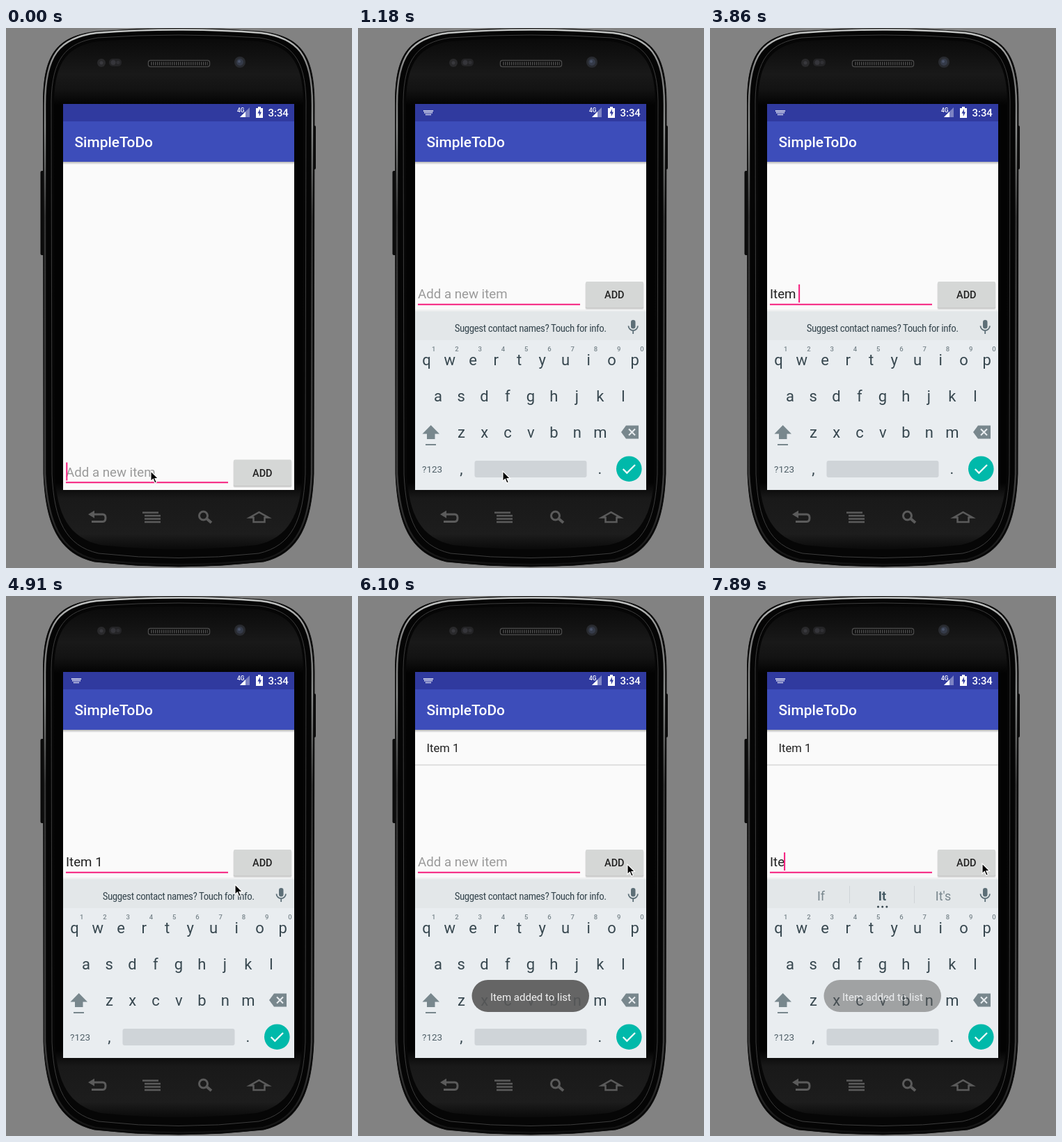
Write an HTML page that moves like this. It is 497 px wide and 775 px high and loops after 8000 ms.

```html
<!DOCTYPE html>
<html lang="en">
<head>
<meta charset="utf-8">
<title>To-do app demo</title>
<style>
  html, body { margin: 0; width: 100%; height: 100%; overflow: hidden; background: #828282; }
  svg { display: block; width: 497px; height: 775px; }
  text { font-family: Roboto, sans-serif; white-space: pre; }
  .mid { text-anchor: middle; }
  .medium { font-weight: 500; }
  .field { font-size: 18.7px; }
  .key { font-size: 22px; fill: #37474f; text-anchor: middle; }
  .digit { font-size: 9.5px; font-weight: 500; fill: #78858b; text-anchor: middle; }
  .word { font-size: 18px; fill: #78868d; text-anchor: middle; }
  .notice { font-family: "Roboto Condensed", Roboto, sans-serif; font-stretch: 75%; font-size: 15px; letter-spacing: -.46px; fill: #37474f; text-anchor: middle; }
</style>
</head>
<body>
<svg viewBox="0 0 497 775">
  <defs>
    <linearGradient id="rim" x2="0" y2="1">
      <stop offset="0" stop-color="#c8cac9"/><stop offset=".08" stop-color="#777"/>
      <stop offset=".18" stop-color="#8a8c8b"/><stop offset=".35" stop-color="#333"/>
      <stop offset=".85" stop-color="#3c3c3c"/><stop offset="1" stop-color="#111"/>
    </linearGradient>
    <linearGradient id="glass" x2="0" y2="1">
      <stop offset="0" stop-color="#0a0a0a"/><stop offset=".07" stop-color="#191919"/>
      <stop offset=".1" stop-color="#131313"/><stop offset=".13" stop-color="#030303"/>
      <stop offset=".87" stop-color="#030303"/><stop offset=".9" stop-color="#191919"/>
      <stop offset=".97" stop-color="#1d1d1d"/><stop offset="1" stop-color="#0a0a0a"/>
    </linearGradient>
    <linearGradient id="shade" x2="0" y2="1">
      <stop offset="0" stop-color="#000" stop-opacity=".28"/><stop offset="1" stop-color="#000" stop-opacity="0"/>
    </linearGradient>
    <clipPath id="screen"><path d="M82 109H414V663H82z"/></clipPath>
  </defs>

  <!-- Phone body -->
  <rect width="497" height="775" fill="#828282"/>
  <rect x="49.5" y="205" width="8" height="121" rx="2" fill="#0b0b0b"/>
  <rect x="438" y="140" width="7" height="63" rx="2" fill="#0b0b0b"/>
  <path fill="#050505" stroke="#111" d="M53.500 110C53 36 74 12 130 5Q248 -4 366 5C422 12 443 36 443 110L442 640C439 712 421 754 370 766Q248 780 127 766C75 754 57 712 54 640z"/>
  <path fill="none" stroke="url(#rim)" stroke-width="2.500" d="M56 110C56 38 77 14 130 7Q248 -2 366 7C419 14 440 38 440 110L439 640C436 710 418 751 369 763Q248 777 128 763C78 751 60 710 56 640z"/>
  <path fill="#060606" stroke="#3c3c3c" d="M65 105C66 44 86 21 132 14Q248 6 364 14C410 21 430 44 431 105L430 640C427 706 411 743 363 754Q248 767 133 754C85 743 69 706 66 640z"/>
  <path fill="url(#glass)" d="M69 105C70 47 90 25 134 19Q248 11 362 19C406 25 426 47 427 105L426 640C423 698 406 732 360 742Q248 754 136 742C90 732 73 698 70 640z"/>

  <!-- Earpiece, sensors and camera -->
  <rect x="204.500" y="46.500" width="88" height="9" rx="3" fill="#0a0a0a" stroke="#474747" stroke-width="1.500"/>
  <path d="M208 51H290" stroke="#4c4c4c" stroke-width="5" stroke-dasharray="1.500 1.500"/>
  <circle cx="137" cy="50" r="6" fill="#29292b"/><circle cx="137" cy="50" r="2.500" fill="#39393d"/>
  <rect x="148" y="44" width="18" height="11" rx="5" fill="#242426"/>
  <circle cx="154" cy="49.500" r="3.500" fill="#35353a"/><circle cx="161" cy="49.500" r="2.500" fill="#303034"/>
  <circle cx="336" cy="49" r="8" fill="#292b30"/><circle cx="336" cy="49" r="5" fill="#353b49"/>
  <circle cx="335" cy="48" r="2" fill="#4b5469"/>

  <!-- Hardware buttons -->
  <g fill="none" stroke="#5b5b5b" stroke-width="3">
    <path d="M124 698H139Q143 698 143 703Q143 708.500 139 708.500H123"/>
    <path d="M118 698L127 692.500V703.500z" fill="#5b5b5b" stroke="none"/>
    <path d="M196 695.500H219M199 700H222M199 704.500H222M199 709H222" stroke-width="2.300"/>
    <circle cx="283.500" cy="700" r="6"/><path d="M288 704L295 710" stroke-width="4"/>
    <path d="M350 702.500L363.500 695L377 702.500H371.500V709H355.500V702.500z" stroke-width="2.500"/>
  </g>

  <g clip-path="url(#screen)">
    <rect x="82" y="109" width="332" height="554" fill="#fafafa"/>
    <rect x="82" y="192" width="332" height="4" fill="url(#shade)"/>
    <rect x="82" y="109" width="332" height="25" fill="#303a9f"/>
    <rect x="82" y="134" width="332" height="58" fill="#3d4dba"/>
    <text class="medium" x="98.500" y="170.500" font-size="20.900" fill="#fff">SimpleToDo</text>
    <path id="imeIcon" d="M94 119H108M95 121.500H107M97 124.300H105" fill="none" stroke="#dfe1f2" stroke-width="1.800" stroke-dasharray="1.600 .5"/>
    <text class="medium" x="332" y="121" font-size="8.300" fill="#fff">4G</text>
    <path d="M350 114V128H336z" fill="#7c83c3"/><path d="M344 120V128H336z" fill="#fff"/>
    <path d="M359 115H362V113H366V115H369V129H359z" fill="#fff"/>
    <path d="M365 116L361.500 122.500H363.800V127L367 120.500H364.800z" fill="#303a9f"/>
    <text class="medium" x="376.500" y="127" font-size="14.900" fill="#fff">3:34</text>

    <g id="listItem">
      <text x="98.500" y="223.500" font-size="16.600" fill="#212121">Item 1</text>
      <path d="M82 242.500H414" stroke="#d6d6d6" stroke-width="1.300"/>
    </g>

    <g id="form">
      <text id="hint" class="field" x="86" y="643.500" fill="#9a9a9a">Add a new item</text>
      <text id="typed" class="field" x="86" y="643.500" fill="#212121"></text>
      <path id="underline" stroke="#212121" stroke-width="1.300"/>
      <rect id="caret" y="623.500" width="2" height="26" fill="#f51d7d"/>
      <path d="M86 652.300H319" stroke="#f51d7d" stroke-width="1.900"/>
      <rect x="326.500" y="621" width="84" height="38.500" rx="2" fill="#000" opacity=".12"/>
      <rect x="327" y="620" width="83" height="38" rx="2" fill="#000" opacity=".12"/>
      <rect id="button" x="327" y="619.500" width="83" height="37.500" rx="2"/>
      <text class="medium mid" x="368.300" y="643.500" font-size="14.500" fill="#212121">ADD</text>
    </g>

    <g id="keyboard">
      <rect x="82" y="404" width="332" height="3" fill="#f0f1f2"/>
      <rect x="82" y="406.500" width="332" height="42" fill="#e3e7e9"/>
      <rect x="82" y="448" width="332" height="215" fill="#e9edf0"/>
      <text id="notice" class="notice" x="247.800" y="436">Suggest contact names? Touch for info.</text>
      <g id="words">
        <text class="word" x="159.500" y="436.500"></text>
        <text class="word" x="247.500" y="436.500" style="font-weight:700;fill:#455a64"></text>
        <text class="word" x="335" y="436.500"></text>
        <path d="M200.500 416V441M293.500 416V441" stroke="#cfd4d7"/>
        <path d="M241.500 446h.01M247.700 446h.01M253.900 446h.01" stroke="#37474f" stroke-width="3" stroke-linecap="round"/>
      </g>
      <g fill="none" stroke="#5d6f77" stroke-width="1.800">
        <rect x="392" y="419" width="6.500" height="12.500" rx="3.200" fill="#5d6f77" stroke="none"/>
        <path d="M388.500 427.500a6.700 6.700 0 0 0 13.400 0M395.200 434V439"/>
      </g>
      <g id="keys"></g>
      <g fill="#78878d">
        <path d="M104.700 570L117 582.500H110.500V590H99V582.500H92.500z"/>
        <rect x="97" y="597" width="15" height="2"/>
        <path d="M378 580L385 570.500H403V589.500H385z"/>
        <path d="M389 575.500L398 584.500M398 575.500L389 584.500" stroke="#e9edf0" stroke-width="2"/>
      </g>
      <text x="92" y="637.500" font-size="13.500" fill="#4f5f67">?123</text>
      <rect x="167.500" y="621" width="161" height="24" rx="3" fill="#cfd4d8"/>
      <circle cx="389.300" cy="632.700" r="18.300" fill="#00b9aa"/>
      <path d="M380.700 633L386.300 638.600L398 627" fill="none" stroke="#fff" stroke-width="2.200"/>
    </g>

    <g id="toast">
      <rect x="163.500" y="551" width="168.500" height="46" rx="23" fill="#575757" opacity=".9"/>
      <text class="mid" x="248" y="580.500" font-size="15" fill="#f2f2f2">Item added to list</text>
    </g>
  </g>

  <path id="pointer" d="M1 1V15.500L4.400 12.300L6.800 18L9.300 17L6.900 11.500H11.500z" fill="#000" stroke="#fff" stroke-width="1.100"/>
</svg>

<script>
const LOOP = 8000;
const $ = id => document.getElementById(id);
const svgNS = "http://www.w3.org/2000/svg";

function addText(className, x, y, content) {
  const node = document.createElementNS(svgNS, "text");
  node.setAttribute("class", className);
  node.setAttribute("x", x);
  node.setAttribute("y", y);
  node.textContent = content;
  $("keys").append(node);
}

const PITCH = 33.25;
const keyRow = (letters, x, y) => [...letters].forEach((c, i) => addText("key", x + i * PITCH, y, c));
keyRow("qwertyuiop", 98.5, 483.5);
keyRow("asdfghjkl", 115, 536);
keyRow("zxcvbnm", 148.5, 588);
keyRow(",", 148.5, 640);
keyRow(".", 347.5, 640);
[..."1234567890"].forEach((c, i) => addText("digit", 108.8 + i * PITCH, 463.5, c));

const initial = {
  caret: 1, text: "", composing: 0, words: null, notice: 1, pointer: [207, 635],
  ime: 0, imeShift: 0, raised: 0, pressed: 0, added: 0, toast: 0
};

// Each step lists only what changes at that time.
const steps = [
  [0, {}],
  [150, { caret: 0 }],
  [600, { caret: 1 }],
  [750, { ime: .6, imeShift: 20, notice: 0 }],
  [890, { ime: 1, imeShift: 0, raised: 1 }],
  [1030, { notice: 1 }],
  [1180, { caret: 0 }],
  [1620, { caret: 1 }],
  [2060, { caret: 0 }],
  [2210, { pointer: null }],
  [2660, { caret: 1 }],
  [2960, { text: "I" }],
  [3110, { composing: 1, words: ["In", "I", "Is"] }],
  [3260, { text: "It", composing: 0 }],
  [3410, { composing: 1, words: ["If", "It", "It's"] }],
  [3560, { text: "Ite", composing: 0 }],
  [3710, { text: "Item", composing: 1, words: ["Items", "Item", "Them"] }],
  [3860, { text: "Item ", composing: 0, words: null }],
  [4160, { text: "Item 1" }],
  [4460, { pointer: [278, 504] }],
  [4610, { pointer: [301, 460], caret: 0 }],
  [4760, { pointer: [319, 429] }],
  [4910, { pointer: [328, 413] }],
  [5060, { pointer: [342, 397], caret: 1 }],
  [5210, { pointer: [350, 388] }],
  [5510, { pressed: 1 }],
  [5650, { text: "", added: 1, toast: .2 }],
  [5800, { pressed: 0, toast: .75 }],
  [5950, { toast: 1, pointer: [368, 386] }],
  [6100, { pointer: [386, 384], caret: 0 }],
  [6250, { pointer: [390, 383] }],
  [6550, { caret: 1 }],
  [7150, { text: "I" }],
  [7300, { composing: 1, words: ["In", "I", "Is"] }],
  [7450, { text: "It", composing: 0 }],
  [7600, { composing: 1, words: ["If", "It", "It's"] }],
  [7740, { toast: .85 }],
  [7890, { text: "Ite", composing: 0, toast: .55 }]
];

let last = initial;
const states = steps.map(([time, change]) => [time, last = { ...last, ...change }]);

const fade = (id, value) => $(id).setAttribute("opacity", Number(value));
const shift = (id, x, y) => $(id).setAttribute("transform", `translate(${x} ${y})`);

function draw(s) {
  const typed = $("typed");
  typed.textContent = s.text;
  const width = s.text ? typed.getComputedTextLength() : 0;
  fade("hint", !s.text);
  fade("caret", s.caret);
  $("caret").setAttribute("x", 86 + Math.max(0.3, width - 1));
  $("underline").setAttribute("d", s.composing ? `M86 647H${86 + width}` : "");
  shift("form", 0, s.raised ? -255.5 : 0);
  $("button").setAttribute("fill", s.pressed ? "#c0c1c1" : "#d5d7d6");
  fade("imeIcon", s.ime > 0);
  fade("keyboard", s.ime);
  shift("keyboard", 0, s.imeShift);
  fade("notice", s.notice && !s.words);
  fade("words", !!s.words);
  $("words").querySelectorAll("text").forEach((node, i) => node.textContent = s.words ? s.words[i] : "");
  fade("listItem", s.added);
  fade("toast", s.toast);
  fade("pointer", !!s.pointer);
  if (s.pointer) shift("pointer", ...s.pointer);
}

const start = performance.now();
function tick() {
  const time = (performance.now() - start) % LOOP;
  draw(states.findLast(([from]) => from <= time)[1]);
  requestAnimationFrame(tick);
}
tick();
</script>
</body>
</html>
```
